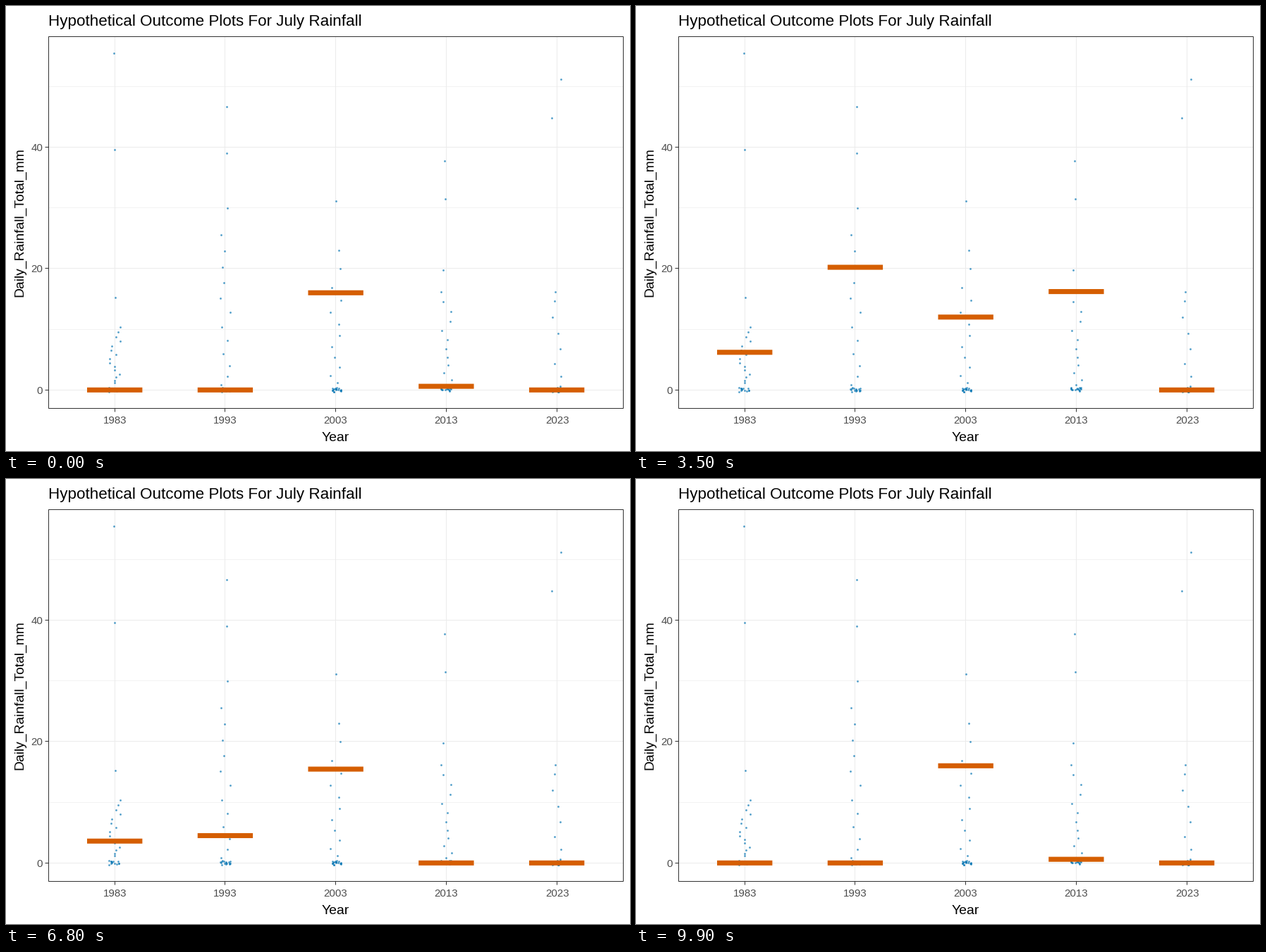
These frames come from a looping animation (885x632 px, 10 s). A matplotlib script:

```python
import numpy as np
import matplotlib.pyplot as plt
from matplotlib.animation import FuncAnimation
from matplotlib.patches import Rectangle

W, H, DPI = 885, 632, 100
FRAMES, STATES, DAYS = 100, 20, 31
LEFT, RIGHT, TOP, BOTTOM = 60.5, 875.5, 43.5, 571.5
X0, STEP = 154.2, 156.73         # first year and spacing, px
Y0, MM = 545.3, 8.625            # zero line and px per mm
BAR_W, BAR_H = STEP / 2, 7.1
JITTER = 8
PX = 72 / DPI                    # one pixel in points

# Three wettest days, then range and number of the other wet days.
RAIN = {
    1983: ([55.5, 39.6, 15.2], (10.3, 1.2, 15)),
    1993: ([46.7, 39.0, 29.9], (25.5, 0.8, 12)),
    2003: ([31.1, 23.0, 20.0], (16.8, 1.2, 10)),
    2013: ([37.7, 31.5, 19.7], (16.2, 0.8, 12)),
    2023: ([51.2, 44.8, 16.1], (14.7, 0.6, 7)),
}

# Wet outcomes drawn for each year, by state; all other draws are dry.
DRAWS = [
    {2: 8.6, 4: 4.2, 7: 6.2, 10: 9, 12: 6, 13: 7.2, 16: 3.2},
    {3: 2.8, 5: 38.6, 7: 20.2, 12: 17.6, 14: 9, 18: 25.6},
    {0: 16, 4: 14.9, 7: 12, 12: 22.8, 13: 30.9, 19: 16.7},
    {0: 0.6, 7: 16.2, 8: 15.8, 12: 8.8},
    {2: 44.4, 6: 6, 11: 14.4, 15: 51.2, 17: 15.8, 18: 44.4},
]

plt.rcParams["font.family"] = ["Liberation Sans", "DejaVu Sans"]
fig = plt.figure(figsize=(W / DPI, H / DPI), dpi=DPI, facecolor="white")
ax = fig.add_axes([0, 0, 1, 1])
ax.set_xlim(0, W)
ax.set_ylim(H, 0)
ax.axis("off")


def year_x(i):
    return X0 + STEP * i


def rain_y(mm):
    return Y0 - MM * mm


def crisp(v):
    return np.floor(v) + 0.5


def line(xs, ys, color, z=1):
    ax.plot(xs, ys, color=color, lw=PX, zorder=z, snap=False,
            solid_capstyle="butt")


def label(x, y, s, size, color="black", **kw):
    ax.text(x, y, s, fontsize=size * PX, color=color, **kw)


def draw_panel():
    for mm in (10, 30, 50):
        line([LEFT, RIGHT], [crisp(rain_y(mm))] * 2, "#F2F2F2")
    for mm in (0, 20, 40):
        y = crisp(rain_y(mm))
        line([LEFT, RIGHT], [y, y], "#EBEBEB")
        line([LEFT - 5, LEFT], [y, y], "#333333", 5)
        label(52, y + 5.4, str(mm), 15, "#4D4D4D", ha="right")
    for i, year in enumerate(RAIN):
        x = crisp(year_x(i))
        line([x, x], [TOP, BOTTOM], "#EBEBEB")
        line([x, x], [BOTTOM, BOTTOM + 5], "#333333", 5)
        label(x, 592.8, str(year), 15, "#4D4D4D", ha="center")
    ax.add_patch(Rectangle((LEFT, TOP), RIGHT - LEFT, BOTTOM - TOP, fill=False,
                           ec="#333333", lw=PX, zorder=5, snap=False))
    label(59.6, 28.3, "Hypothetical Outcome Plots For July Rainfall", 22.4)
    label(467.3, 618.3, "Year", 19.4, ha="center")
    label(24.6, 307, "Daily_Rainfall_Total_mm", 19.3, rotation=90,
          ha="center", va="baseline", rotation_mode="anchor")


def draw_days():
    """Scatter each month: peaks, a falling tail, and dry days near zero."""
    rng = np.random.default_rng(7)
    for i, (peaks, (high, low, n)) in enumerate(RAIN.values()):
        tail = low + (high - low) * np.linspace(1, 0, n) ** 1.2
        dry = rng.uniform(-0.3, 0.4, DAYS - len(peaks) - n)
        mm = np.concatenate([peaks, tail, dry])
        x = year_x(i) + rng.uniform(-JITTER, JITTER, DAYS)
        ax.scatter(x, rain_y(mm), s=(2.8 * PX) ** 2, color="#0072B2",
                   alpha=0.68, linewidths=0, zorder=3)


draw_panel()
draw_days()

bars = [ax.add_patch(Rectangle((year_x(i) - BAR_W / 2, 0), BAR_W, BAR_H,
                               fc="#D55E00", lw=0, zorder=4, snap=False))
        for i in range(len(RAIN))]

outcome = np.array([[d.get(s, 0) for d in DRAWS] for s in range(STATES)])

# One halfway frame ends each state; the second half runs a frame early.
TWEENS = [4 + 5 * k - (k >= STATES // 2) for k in range(STATES)]


def update(frame):
    state = sum(t < frame for t in TWEENS) % STATES
    mm = outcome[state]
    if frame in TWEENS:
        mm = (mm + outcome[(state + 1) % STATES]) / 2
    for bar, v in zip(bars, mm):
        bar.set_y(rain_y(v) - BAR_H / 2)
    return bars


anim = FuncAnimation(fig, update, frames=FRAMES, interval=100, repeat=True,
                     repeat_delay=0, blit=False)
plt.show()
```
